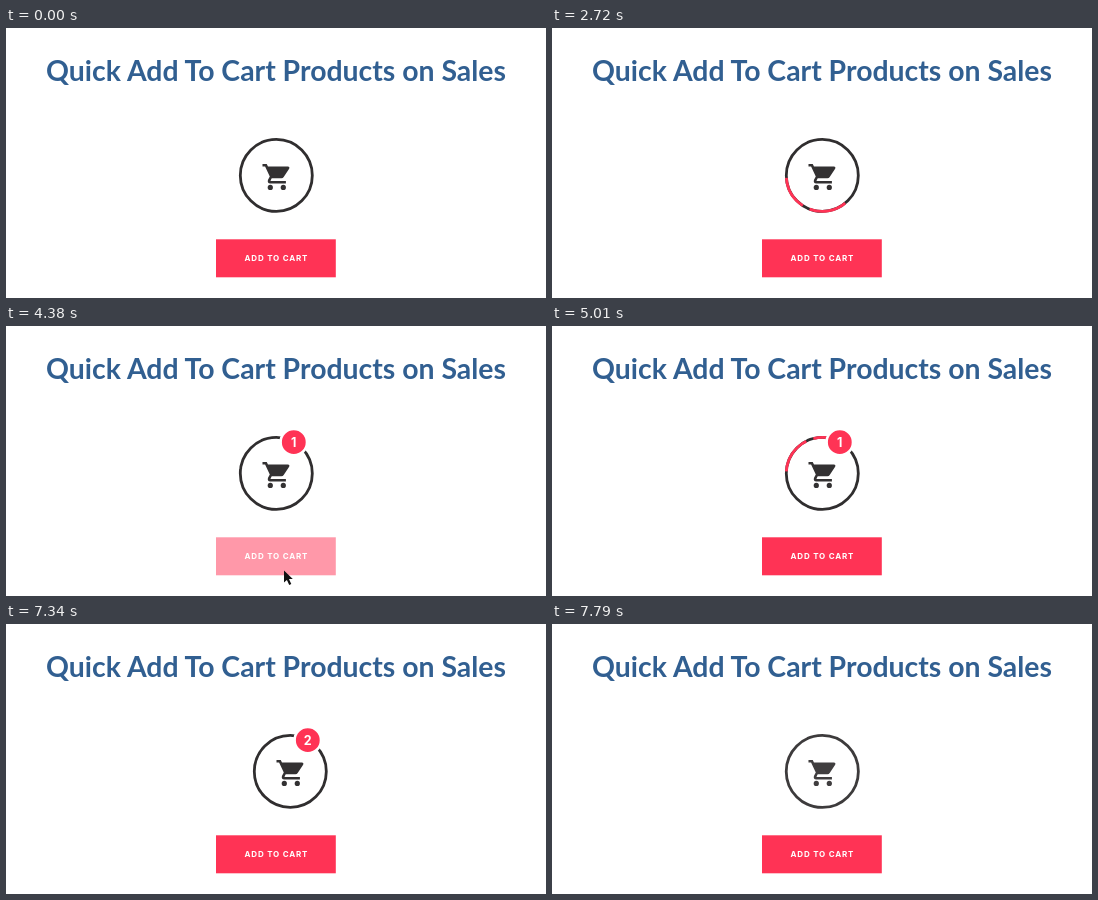
Animation, 540 px wide and 270 px high, one loop 7.82 s. Source, as an HTML page:

```html
<!DOCTYPE html>
<html lang="en">
<head>
<meta charset="utf-8">
<title>Add to cart</title>
<style>
  html, body { margin: 0; width: 100%; height: 100%; overflow: hidden; background: #fff; }
  svg { display: block; width: 100%; height: 100%; }
  text { text-anchor: middle; }
  .title { font: 700 28.4px Lato, sans-serif; fill: #315f91; }
  .label { font: 700 8px Inter, sans-serif; letter-spacing: .8px; fill: #fff; }
  .count { font: 700 12.5px Inter, sans-serif; fill: #fff; }
  .ring { fill: none; stroke: #302e2f; stroke-width: 2.8; }
  .arc { fill: none; stroke: #ff3355; stroke-width: 2.8; }
</style>
</head>
<body>
<svg viewBox="0 0 540 270">
  <rect width="540" height="270" fill="#fff"/>
  <text class="title" x="270" y="53">Quick Add To Cart Products on Sales</text>
  <g id="cart">
    <circle class="ring" cx="270.3" cy="147.4" r="36"/>
    <path id="arcs" class="arc"/>
    <g transform="translate(255.2 133.4) scale(1.3)" fill="#333132">
      <path d="M1 2H4.27L5.21 4H20.5Q22.2 4.2 21.5 5.6L17.3 12Q16.7 13 15.55 13H8.1L7.2 14.63Q7.1 15 7.42 15H19V17H7Q4.4 16.6 5.25 14.04L6.6 11.59L3 4H1Z"/>
      <circle cx="7" cy="20" r="2"/>
      <circle cx="17" cy="20" r="2"/>
    </g>
    <g id="badge">
      <circle r="13.2" fill="#ff3355" stroke="#fff" stroke-width="2.6"/>
      <text id="count" class="count" y="4.5">1</text>
    </g>
  </g>
  <g id="button">
    <rect x="210" y="211.3" width="119.8" height="38" fill="#ff3355"/>
    <text class="label" x="270.4" y="233.3">ADD TO CART</text>
  </g>
  <path id="cursor" d="M0 0V12L2.9 9.4L5.2 14.6L7.3 13.6L5 8.6H8.8Z" fill="#111"/>
</svg>
<script>
const LOOP = 7820, STEP = 30;
const CX = 270.3, CY = 147.4, R = 36;
const clicks = [
  { enter: 2030, rest: 2180, leave: 2480 },
  { enter: 4200, rest: 4380, leave: 4680 }
];
const starts = [0, 2030, 4200, 7340];
const $ = id => document.getElementById(id);
const cart = $('cart'), arcs = $('arcs'), badge = $('badge');
const count = $('count'), button = $('button'), cursor = $('cursor');

const ramp = (t, a, b) => Math.min(1, Math.max(0, (t - a) / (b - a)));
const mix = (a, b, p) => a + (b - a) * p;
const easeOut = p => 1 - (1 - p) ** 2;

// The motion advances in even steps from the start of each scene.
function snap(t) {
  const s = starts.filter(v => v <= t).pop();
  return s + Math.floor((t - s) / STEP) * STEP;
}

function arc(from, to) {
  if (to - from < .5) return '';
  const at = d => {
    const a = d * Math.PI / 180;
    return (CX + R * Math.cos(a)).toFixed(2) + ' ' + (CY + R * Math.sin(a)).toFixed(2);
  };
  return `M${at(from)}A${R} ${R} 0 ${to - from > 180 ? 1 : 0} 1 ${at(to)}`;
}

function drawPointer(t) {
  const c = clicks.find(k => t >= k.enter && t < k.leave + 150);
  if (!c) {
    cursor.setAttribute('opacity', 0);
    button.setAttribute('opacity', 1);
    return;
  }
  const p = ramp(t, c.enter, c.rest);
  const away = ramp(t, c.leave - STEP, c.leave + 120);
  cursor.setAttribute('transform', `translate(278 ${mix(268, 244.5, easeOut(p))})`);
  cursor.setAttribute('opacity', 1 - away);
  button.setAttribute('opacity', 1 - .5 * ramp(p, .4, 1) * (1 - away));
}

function drawArcs(t) {
  const c = clicks.find(k => t >= k.leave && t < k.leave + 430);
  if (!c) return arcs.setAttribute('d', '');
  const u = t - c.leave;
  const head = mix(-90, 300, ramp(u, 60, 324));
  const tail = mix(-90, 300, ramp(u, 145, 409));
  const lead = mix(-90, 300, ramp(u, 96, 360));
  arcs.setAttribute('d', arc(tail, lead - 12) + arc(lead, head));
}

function drawBadge(t) {
  const pops = clicks.map(c => c.leave + 340);
  const n = pops.filter(v => t >= v).length;
  let scale = n && t < 7700 ? 1 : 0;
  if (scale) {
    const u = t - pops[n - 1];
    const base = n === 1 ? ramp(u, -20, 130) : 1;
    const peak = n === 1 ? 1.5 : 1.5;
    scale = u < 130 ? mix(base === 1 ? 1 : 0, peak, easeOut(ramp(u, -20, 130)))
                    : mix(peak, 1, easeOut(ramp(u, 130, 320)));
  }
  count.textContent = n > 1 ? 2 : 1;
  badge.setAttribute('transform', `translate(287.8 116.2) scale(${scale})`);
}

function drawCart(t) {
  let x = 0, scale = 1, alpha = 1;
  if (t >= 7340 && t < 7700) {
    const p = ramp(t, 7340, 7520);
    x = mix(14, -78, p * p);
    alpha = 1 - p;
  } else if (t >= 7700) {
    const p = ramp(t, 7700, 7800);
    scale = mix(1.19, 1, easeOut(p));
    alpha = mix(.35, 1, p);
  }
  cart.setAttribute('opacity', alpha);
  cart.setAttribute('transform',
    `translate(${CX + x} ${CY}) scale(${scale}) translate(${-CX} ${-CY})`);
}

function draw(time) {
  const t = snap(time % LOOP);
  drawPointer(t);
  drawArcs(t);
  drawBadge(t);
  drawCart(t);
}

const begin = performance.now();
function tick() {
  draw(performance.now() - begin);
  requestAnimationFrame(tick);
}
draw(0);
tick();
</script>
</body>
</html>
```
